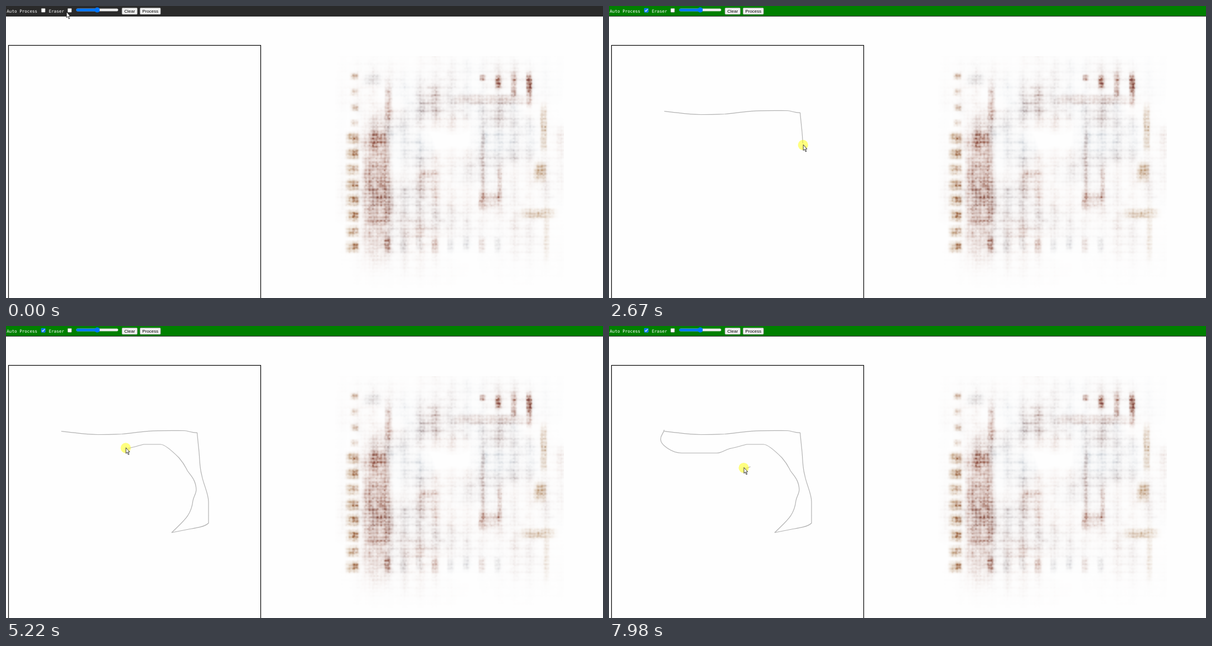
Write an HTML page with a canvas that moves like this. It is 1070 px wide and 523 px high and loops after 8000 ms.

```html
<!DOCTYPE html>
<html lang="en">
<head>
<meta charset="utf-8">
<title>Sketch pad</title>
<style>
  html, body { margin: 0; width: 100%; height: 100%; overflow: hidden; background: #fefefe; }
  canvas, svg { position: absolute; left: 0; top: 0; }
  .label { font: 7.6px "DejaVu Sans Mono", monospace; fill: #fff; }
  .box { fill: #fff; stroke: #767676; stroke-width: .6; }
  .button text { font: 8px "Liberation Sans", Arial, sans-serif; text-anchor: middle; }
  .button rect { fill: #efefef; stroke: #767676; stroke-width: .6; }
  .ink { fill: none; stroke: #b2b2b2; stroke-width: 1.2; stroke-linejoin: round; }
</style>
</head>
<body>
<canvas id="print" width="1070" height="523"></canvas>
<svg width="1070" height="523" viewBox="0 0 1070 523">
  <rect id="bar" width="1070" height="18"/>
  <rect y="17.8" width="1070" height=".9" fill="#000"/>
  <text class="label" x="1.3" y="11.7">Auto Process</text>
  <rect class="box" x="63.3" y="4.3" width="7" height="7" rx="1"/>
  <g id="tick">
    <rect x="63" y="4" width="7.6" height="7.6" rx="1" fill="#0075ff"/>
    <path d="M64.5 8L66.1 9.6 69.2 5.7" fill="none" stroke="#fff" stroke-width="1.1"/>
  </g>
  <text class="label" x="76.7" y="11.7">Eraser</text>
  <rect class="box" x="110.6" y="4.3" width="7" height="7" rx="1"/>
  <rect x="126" y="4.8" width="75" height="4.5" rx="2.2" fill="#efefef" stroke="#b2b2b2" stroke-width=".4"/>
  <rect x="125.8" y="4.7" width="38" height="4.7" rx="2.3" fill="#0075ff"/>
  <circle cx="163.5" cy="7" r="4.6" fill="#0075ff"/>
  <g class="button"><rect x="207.8" y="3.3" width="27.6" height="11.8" rx="1.5"/><text x="221.6" y="12">Clear</text></g>
  <g class="button"><rect x="240.1" y="3.3" width="37" height="11.8" rx="1.5"/><text x="258.6" y="12">Process</text></g>
  <rect x="4.5" y="70.5" width="452" height="480" fill="none" stroke="#000" stroke-width="1.2"/>
  <path id="outline" class="ink"/>
  <path id="dash" class="ink" d="M253.5 252L245 255.5"/>
  <g id="pointer">
    <circle id="halo" r="9.1" fill="#ff0" fill-opacity=".5"/>
    <path d="M.4 -.5V9.8L2.7 7.7 4.5 12 6.1 11.3 4.3 7.2H7.2Z" fill="#fff" stroke="#000" stroke-width=".75"/>
  </g>
</svg>
<script>
const LOOP = 8000, CLICK = 680, CLOSED = 6660, LAG = 5;
const el = id => document.getElementById(id);
const path = el('outline');

// The pointer moves in steps: each holds a place, and how much of the outline is drawn
const steps = [{ t: 0, x: 108, y: 11 }];
function addSteps(from, to, count, place) {
  const gap = (to - from) / Math.max(1, count - 1);
  for (let k = 0; k < count; k++)
    steps.push({ t: k ? from + (k - .15) * gap : from, ...place(k) });
}

function move(from, to, count, d, down = false) {
  path.setAttribute('d', d);
  const length = path.getTotalLength();
  addSteps(from, to, count, k => {
    const { x, y } = path.getPointAtLength(length * k / Math.max(1, count - 1));
    return { x, y, down };
  });
}

let trail = 'M99 188.5', drawn = 0;
function draw(from, to, count, curve, power = 1) {
  path.setAttribute('d', trail += curve);
  const start = drawn;
  drawn = path.getTotalLength();
  addSteps(from, to, count, k => {
    const reach = drawn - (drawn - start) * (1 - (k + 1) / count) ** power;
    const { x, y } = path.getPointAtLength(reach);
    return { x, y: y - 1.7, down: true, reach };
  });
}

move(120, 340, 3, 'M95 11L69 6.5');
move(560, 560, 1, 'M69 6.5h.1', true);
move(CLICK, CLICK, 1, 'M69 6.5h.1');
move(900, 1680, 8, 'M72 12C150 110 235 270 99 186');
draw(1800, 1800, 1, 'L102 188.8');
draw(1907, 2550, 7, 'C125 191 140 194.5 165 194.5S190 194.2 208 193.5C225 192 235 189.8 256 188.3C275 187 305 187.5 320 187.5C328 188 333 191.5 342.5 191L345 216', 2.6);
draw(2670, 3010, 4, 'C348 240 346 250 351 268C354 284 363 300 363 315V353');
draw(3230, 3550, 4, 'C356 360 340 362 330 363.5L297 370', 1.2);
draw(3880, 4660, 8, 'C318 349 332 340 335 313C336 306 341 300 341 293C340 275 331 268 325 259C320 248 316 243 310 236');
draw(4760, 5540, 8, 'C299 225 285 212 277 212H247C235 215 225 218 216 219.7C205 223 202 227.5 193 227.5H142', .9);
draw(5660, 6320, 7, 'H130C113 227.5 92.5 213 92.5 203C92.5 195 97 194 99 186');
move(CLOSED, 7000, 4, 'M98.5 184Q150 245 229 295');
move(7210, 7550, 4, 'M235 288L263 256');
move(7860, 7980, 2, 'M253 254H241.5', true);
path.setAttribute('d', trail);

const show = (id, on) => el(id).style.visibility = on ? 'visible' : 'hidden';
let shown;

function frame(now) {
  const t = now % LOOP;
  const step = steps.findLast(s => s.t <= t);
  if (step !== shown) {
    shown = step;
    el('bar').setAttribute('fill', t >= CLICK ? '#008000' : '#2a2a2a');
    show('tick', t >= CLICK);
    el('pointer').setAttribute('transform', `translate(${step.x} ${step.y})`);
    show('halo', step.down);
    show('dash', step === steps.at(-1));
    const reach = t >= CLOSED ? drawn : (step.reach || 0) - LAG;
    show('outline', reach > 0);
    path.style.strokeDasharray = `${Math.max(0, reach)} 9999`;
  }
  requestAnimationFrame(frame);
}

// Woven, blotchy print on the right
const X0 = 590, Y0 = 90, W = 410, H = 415, CELL = 28.1;
const BROWN = [92, 146, 162], TAN = [65, 100, 135], GREY = [84, 86, 82], BLUE = [84, 76, 66];
const absorbed = new Float32Array(W * H * 3);

function hash(x, y) {
  let h = Math.imul(x, 374761393) + Math.imul(y, 668265263);
  h = Math.imul(h ^ (h >>> 13), 1274126177);
  return ((h ^ (h >>> 16)) >>> 0) / 4294967296;
}
function noise(x, y, size) {
  x /= size; y /= size;
  const i = Math.floor(x), j = Math.floor(y), ease = v => v * v * (3 - 2 * v);
  const u = ease(x - i), v = ease(y - j);
  const row = k => hash(i, k) * (1 - u) + hash(i + 1, k) * u;
  return row(j) * (1 - v) + row(j + 1) * v;
}
const wave = (v, depth) => 1 - depth + depth * Math.cos(8 * Math.PI * v / CELL);
const weave = (x, y) => 1.35 * wave(x - 742, .13) * wave(y - 237, .17)
  * (.65 + .7 * noise(x, y, 3)) * (.5 + noise(x, y, 11));
const bump = (x, y) => Math.exp(-(x ** 4) - y ** 4);

function blob(cx, cy, rx, ry, strength, tone, mask = bump) {
  const left = Math.max(X0, Math.floor(cx - 1.6 * rx)), right = Math.min(X0 + W, cx + 1.6 * rx);
  const top = Math.max(Y0, Math.floor(cy - 1.6 * ry)), bottom = Math.min(Y0 + H, cy + 1.6 * ry);
  for (let y = top; y < bottom; y++)
    for (let x = left; x < right; x++) {
      const a = strength * mask((x - cx) / rx, (y - cy) / ry, x, y) * weave(x, y);
      const p = ((y - Y0) * W + x - X0) * 3;
      for (let c = 0; c < 3; c++) absorbed[p + c] += a * tone[c];
    }
}

// Tall dark block with its lighter left side and core
blob(670, 326, 18, 112, .34, BROWN);
blob(647, 328, 9, 108, .26, BROWN);
blob(666, 238, 14, 15, .3, BROWN);
blob(668, 300, 15, 50, .12, BROWN);
blob(685, 173, 6, 32, .26, BROWN);
blob(656, 131, 15, 10, .22, GREY);

// Beads down the left edge
for (let i = 0; i < 12; i++) {
  const y = 126 + i * 27.7, faint = i < 4;
  blob(faint ? 624 : 621, y, faint ? 7 : 11, faint ? 6 : 10, faint ? .26 : .5, TAN);
  blob(625, y - 1, 6, 5, faint ? .12 : .25, BROWN);
}

// Drips along the top, longer to the right
for (let i = 0; i < 4; i++) {
  const x = 854 + i * 27.8, half = 6 + i * 7;
  blob(x, 122 + half, 5, half, .5, BROWN);
}
blob(937, 138, 5, 16, .45, BROWN);
blob(872, 167, 64, 9, .2, BROWN);

// Right edge and the hook beside it
blob(963, 220, 6, 36, .42, TAN);
blob(957, 297, 10, 16, .5, TAN);
blob(953, 371, 28, 9, .36, TAN);
blob(968, 400, 5, 50, .16, TAN);
blob(853, 346, 6, 16, .35, BROWN);
blob(870, 347, 16, 13, .2, BROWN);
blob(884, 325, 4, 34, .25, BROWN);
blob(854, 275, 4, 60, .16, BROWN);
blob(755, 300, 17, 7, .22, BROWN);

// Smudges along the foot
for (let i = 0; i < 8; i++)
  blob(684 + i * CELL, 430 - 6 * hash(i, 3), 6, 13, .3 - i * .025, i % 3 ? GREY : BROWN);

// Faint lattice of columns and rows
const near = (v, origin, period, width) => {
  const d = v - origin - Math.round((v - origin) / period) * period;
  return Math.exp(-d * d / (2 * width * width));
};
const edge = d => 1 / (1 + Math.exp(-d));
[[BROWN, 0], [BLUE, 500]].forEach(([tone, seed]) =>
  blob(812, 283, 172, 160, .32, tone, (u, v, x, y) => {
    const patch = Math.max(0, noise(x + seed, y + seed, 40) - .2);
    const clear = 1 - .6 * edge((x - 775) / 12) * edge((y - 280) / 12);
    return bump(u, v) * clear * patch * (.25 + near(x, 742, CELL, 5) + .5 * near(y, 173, CELL / 2, 2.5));
  }));

const context = el('print').getContext('2d');
const image = context.createImageData(W, H);
for (let p = 0; p < W * H; p++) {
  for (let c = 0; c < 3; c++) image.data[p * 4 + c] = 254 - Math.min(absorbed[p * 3 + c], 175);
  image.data[p * 4 + 3] = 255;
}
context.putImageData(image, X0, Y0);
requestAnimationFrame(frame);
</script>
</body>
</html>
```
